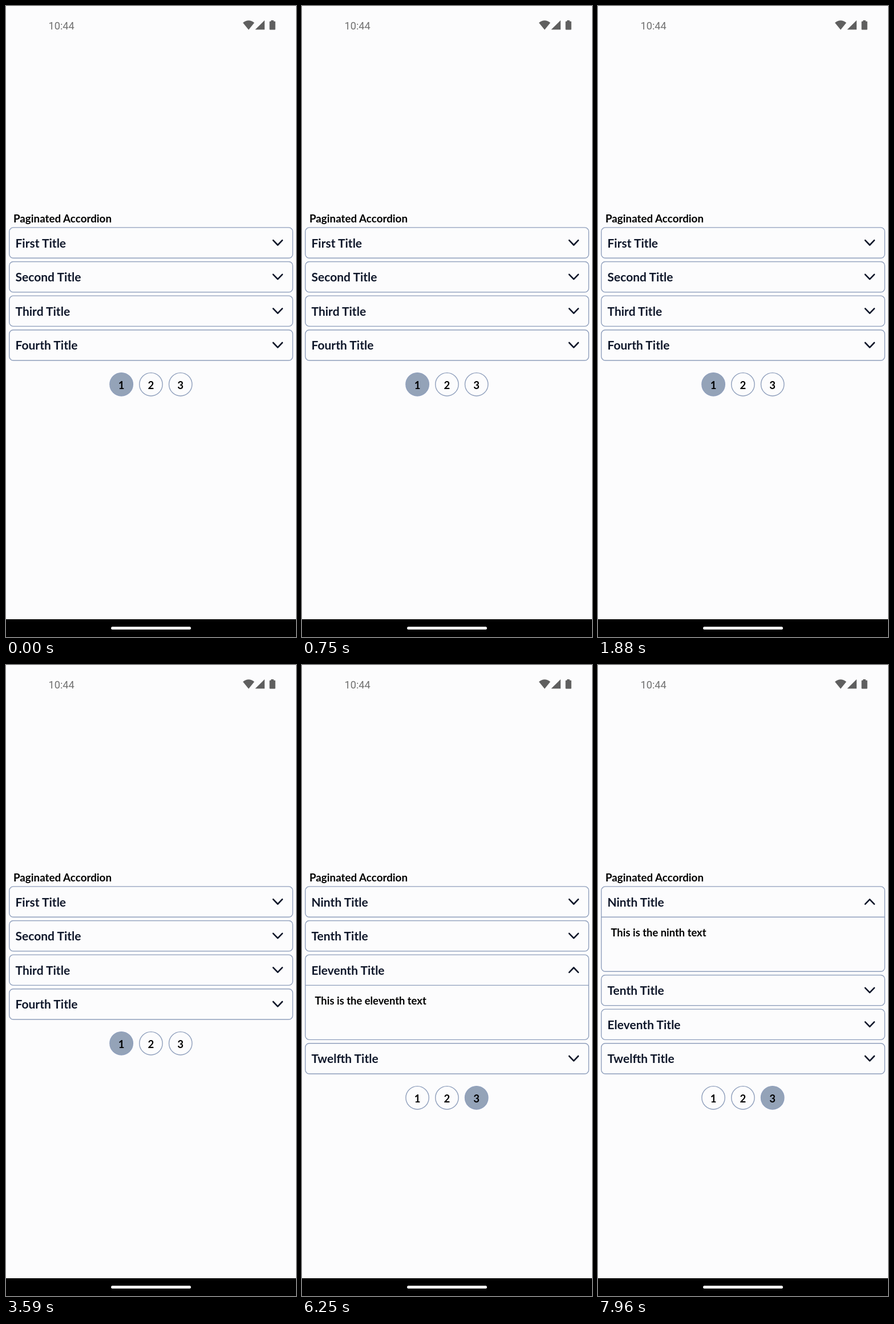
These frames come from a looping animation (508x1102 px, 8000 ms). An HTML page:

```html
<!DOCTYPE html>
<html lang="en">
<head>
<meta charset="utf-8">
<title>Paginated Accordion</title>
<style>
  html, body { margin: 0; width: 100%; height: 100%; overflow: hidden; background: #fcfcfd; }
  svg { display: block; }
  text { font-family: Lato, "Open Sans", sans-serif; font-weight: 700; }
  .clock { font: 400 18.2px Roboto, sans-serif; fill: #707070; }
  .icons { fill: #5f5f5f; }
  .heading { font-size: 18.8px; }
  .title { font-size: 21px; fill: #0f172a; }
  .body { font-size: 18.4px; }
  .digit { font-size: 18.5px; text-anchor: middle; }
  .line { fill: none; stroke: #8f9fbc; stroke-width: 1.4; }
  .chevron { fill: none; stroke: #0f172a; stroke-width: 2.6; stroke-linecap: round; stroke-linejoin: round; }
</style>
</head>
<body>
<svg id="stage" width="508" height="1102" viewBox="0 0 508 1102">
  <rect width="508" height="1102" fill="#fcfcfd"/>
  <text class="clock" x="74.5" y="40.5">10:44</text>
  <g class="icons">
    <path d="M425 41.5 415 29.2Q425 21.3 435 29.2Z"/>
    <path d="M453 25V41.3H436.5Z"/>
    <path d="M464.2 25h4.6v1.7h2q1 0 1 1V40.600q0 1-1 1h-8.2q-1 0-1-1V27.700q0-1 1-1h1.600Z"/>
  </g>
  <svg y="355" width="508" height="26"><text class="heading" x="13" y="23">Paginated Accordion</text></svg>
  <g id="rows"></g>
  <g id="pager"></g>
  <rect y="1071" width="508" height="31"/>
  <rect x="184" y="1084" width="140" height="5" rx="2.5" fill="#f8f8f8"/>
</svg>
<script>
const LOOP = 8000, SLIDE = 250;
const TOP = 386.9, ROW = 53.3, PITCH = 59.6, PANEL = 95;
const PAGES = {
  1: ['First', 'Second', 'Third', 'Fourth'],
  3: ['Ninth', 'Tenth', 'Eleventh', 'Twelfth']
};
const PAGE_AT = 4600;
// When each row of the last page opens and closes.
const OPEN = { 2: [5700, 7000], 0: [7000, LOOP + SLIDE] };

function add(parent, tag, attrs, text = '') {
  const el = document.createElementNS('http://www.w3.org/2000/svg', tag);
  for (const key in attrs) el.setAttribute(key, attrs[key]);
  el.textContent = text;
  parent.append(el);
  return el;
}

const rowsBox = document.getElementById('rows');
const pager = document.getElementById('pager');

// Each row is a nested svg, so its panel text is clipped to its height.
const rows = [0, 1, 2, 3].map(() => {
  const box = add(rowsBox, 'svg', { width: 508 });
  return {
    box,
    frame: add(box, 'rect', { class: 'line', x: 5.8, y: 1, width: 496.5, rx: 7 }),
    divider: add(box, 'path', { class: 'line', d: `M6 ${ROW + 1}H502` }),
    title: add(box, 'text', { class: 'title', x: 16.5, y: 35.7 }),
    body: add(box, 'text', { class: 'body', x: 22.5, y: 88.3 }),
    chevron: add(box, 'path', { class: 'chevron', d: 'M468 23.3 476 31.6 484 23.3' })
  };
});

const dots = [1, 2, 3].map(n => {
  const cx = 150.3 + 51.8 * n;
  const dot = add(pager, 'circle', { class: 'line', cx, cy: 660.8, r: 20.2 });
  add(pager, 'text', { class: 'digit', x: cx, y: 668.6 }, n);
  return dot;
});

const ease = x => {
  x = Math.min(1, Math.max(0, x));
  return x * x * (3 - 2 * x);
};

function openness(i, t) {
  if (!OPEN[i]) return 0;
  const [from, to] = OPEN[i];
  return ease((t - from) / SLIDE) - ease((t - to) / SLIDE);
}

let shown;
function showPage(page) {
  if (page === shown) return;
  shown = page;
  rows.forEach((row, i) => {
    const name = PAGES[page][i];
    row.title.textContent = `${name} Title`;
    row.body.textContent = `This is the ${name.toLowerCase()} text`;
  });
  dots.forEach((dot, i) => dot.style.fill = i + 1 === page ? '#94a3b8' : 'none');
}

function draw(now) {
  const t = now % LOOP;
  showPage(t < PAGE_AT ? 1 : 3);
  let shift = 0;
  rows.forEach((row, i) => {
    const open = openness(i, t), height = ROW + PANEL * open;
    row.box.setAttribute('y', TOP - 1 + i * PITCH + shift);
    row.box.setAttribute('height', height + 2);
    row.frame.setAttribute('height', height);
    row.divider.style.opacity = row.body.style.opacity = open > 0 ? 1 : 0;
    row.chevron.setAttribute('transform', `rotate(${180 * open} 476 27.5)`);
    shift += PANEL * open;
  });
  pager.setAttribute('transform', `translate(0 ${shift})`);
  requestAnimationFrame(draw);
}
draw(performance.now());
</script>
</body>
</html>
```
